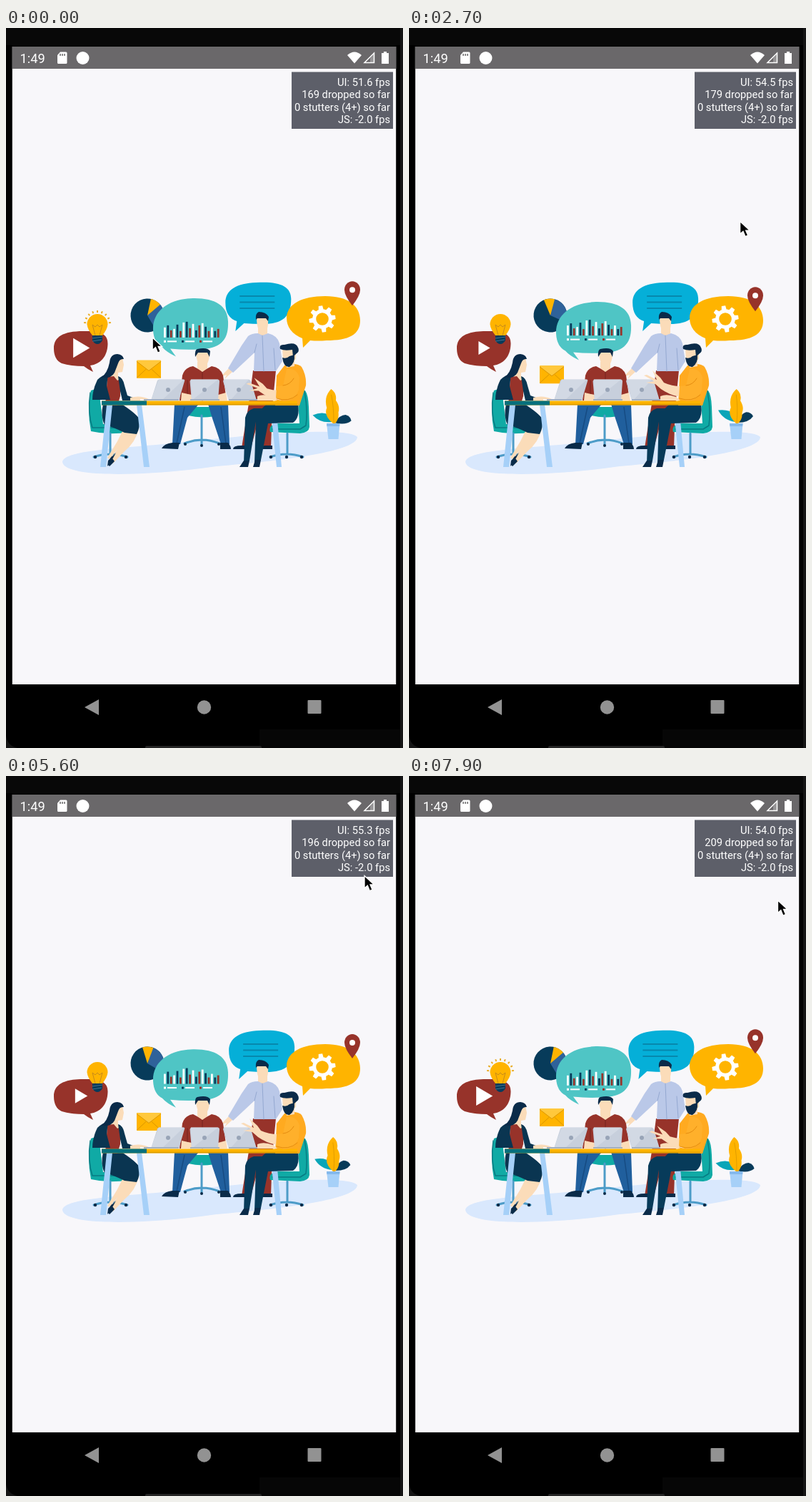
Recreate the animation shown at these times as an HTML page. Size 556 px wide and 1007 px high, loop 8000 ms.

```html
<!DOCTYPE html>
<html lang="en">
<head>
<meta charset="utf-8">
<style>
html, body { margin: 0; width: 100%; height: 100%; overflow: hidden; background: #000; }
svg { display: block; }
text { font-family: Roboto, sans-serif; fill: #fff; white-space: pre; }
.skin { fill: #fbdcb9; } .navy { fill: #073b5a; } .dark { fill: #0a2b49; }
.red { fill: #97332a; } .yellow { fill: #ffb400; } .teal { fill: #10aaa5; }
.sky { fill: #a6d0f8; } .white { fill: #fff; } .jacket { fill: #0a3551; }
.line { fill: none; stroke-linecap: round; stroke-linejoin: round; }
</style>
</head>
<body>
<svg width="556" height="1007" viewBox="0 0 556 1007">
  <!-- Phone and system bars -->
  <rect width="556" height="1007" fill="#000"/>
  <rect width="556" height="24" fill="#080808"/>
  <rect x="355" y="981" width="201" height="26" fill="#060606"/>
  <path d="M552 0h4v1007h-4zM0 990q2 14 16 17H0z" fill="#151515"/>
  <rect x="195" y="1004" width="163" height="5" rx="2" fill="#252525"/>
  <rect x="8.800" y="26" width="537.400" height="892" fill="#f8f7fa"/>
  <rect x="8.800" y="26" width="537.400" height="31" fill="#6a686a"/>
  <text x="19.500" y="48.500" font-size="18.300">1:49</text>
  <path class="white" d="M76 33.500h8q1.500 0 1.500 1.500v13.500q0 1.500-1.500 1.500H73.500q-1.500 0-1.500-1.500V38zM478 38q10-9 20 0l-10 11.500zM526 35h3v-2h4v2h3v15h-10z"/>
  <path d="M76 36v3m3-3v3m3-3v3" stroke="#6a686a" stroke-width="1.500"/>
  <circle class="white" cx="107.500" cy="42" r="9"/>
  <path d="M502 48.500h13.500V35z" fill="none" stroke="#fff" stroke-width="1.500"/>
  <path d="M510 42l5.500-6.500v13H510z" class="white" opacity=".3"/>
  <g fill="#929292"><path d="M110 950l20-11v22z"/><circle cx="277.500" cy="950" r="9.700"/><rect x="422.500" y="940" width="19" height="19" rx="1"/></g>

  <path d="M79 607C81 589 170 588 260 578C350 568 480 557 492 572C492 592 390 605 295 613C200 627 82 630 79 607Z" fill="#d9e8fd"/>

  <!-- Floating symbols -->
  <g id="pie">
    <circle class="navy" cx="198" cy="402" r="23.500"/>
    <path d="M198 402L207.500 380.500A23.500 23.500 0 0 1 216 417Z" fill="#2f629a"/>
    <path class="yellow" d="M198 402L195 378.700A23.500 23.500 0 0 1 210 381.700Z"/>
  </g>
  <g id="chartBubble">
    <path fill="#4fc5c5" d="M206 425C205 398 228 381.500 262 380.500C293 380 310.500 391 311 413C312 440 300 451 270 452Q249 453 230 451L238 462Q225 456 219 449Q207 443 206 425Z"/>
  </g>
  <g id="chart"></g>
  <g id="blueBubble">
    <path fill="#05afd8" d="M308 384C308 366 324 357 351 356C384 354 400 361 400 379C400 404 388 414 360 414Q346 414 334 413L322 424L324 410Q308 405 308 384Z"/>
    <path d="M328 375h49M328 383.500h49M328 392h49" stroke="#0788ad" stroke-width="2.200"/>
  </g>
  <path class="yellow" d="M393 405C394 386 414 375 447 375C480 375 496 389 496 409C496 429 480 437 449 437Q437 438 426 437L416 447L415 434Q393 425 393 405Z"/>
  <g id="gear" transform="translate(443 407)"></g>
  <g id="pin">
    <path class="red" d="M485 389Q474 375 474 367A11 12 0 0 1 496 367Q496 375 485 389Z"/>
    <circle class="white" cx="485" cy="367" r="4"/>
  </g>
  <path class="red" d="M67 448C67 432 80 424 108 424C134 423 143 429 142.500 442C142 460 132 470 118 472L122 481Q114 477 109 473Q91 473 78 469Q67 464 67 448Z"/>
  <path id="play" class="white" d="M-8-10L9 0L-8 10Z"/>
  <path class="yellow" d="M113.500 414.500A14.500 14.500 0 0 1 142.500 414.500Q142 421 135 430H121Q114 421 113.500 414.500Z"/>
  <path d="M125 430l-4-15 4 3 3-3 3 3 4-3-4 15" fill="none" stroke="#c68a1b" stroke-width="1"/>
  <path class="navy" d="M121 430h14v7q-3 5-7 5t-7-5z"/>
  <path d="M121 434l14-2m-14 6l13-2" stroke="#41718f" stroke-width="1"/>
  <g id="rays" stroke="#e9ad28" stroke-width="2"></g>
  <g id="mail">
    <rect class="yellow" x="183" y="468.500" width="34" height="25" rx="1.500"/>
    <path d="M183 470l17 13 17-13v-1.500h-34z" fill="#ffc83c"/>
    <path d="M183 470l17 13 17-13M183 493l13-12m21 12l-13-12" fill="none" stroke="#dc9600" stroke-width="1"/>
  </g>

  <!-- Plant -->
  <g id="leafLeft"><path d="M457 551Q440 551 431 538Q446 534 454 541Q458 546 457 551Z" fill="#0aa5b8"/></g>
  <g id="leafRight"><path class="navy" d="M460 552Q466 540 474 539Q481 540 483 546Q476 554 460 552Z"/></g>
  <g id="leafMid"><path class="yellow" d="M458 553Q445 542 450 531Q446 515 457 505Q465 511 463 521Q469 530 466 538Q467 547 461 553Z"/><path d="M459 552Q460 530 457 513" class="line" stroke="#db9800" stroke-width=".8"/></g>
  <path class="sky" d="M449 553h18.500l-2 22h-14z"/><path d="M449 553h18.500l-.4 4h-17.700z" fill="#85b9ec"/>

  <!-- Standing man -->
  <path class="red" d="M346 479H378L373 530L371 587H361L358 532L343 587H330L340 525Z"/>
  <path class="dark" d="M318 589q0-5 12-5h13v5zM357 589q0-5 6-5h10v5z"/>
  <path class="skin" d="M353 416h13v15h-13zM312 476L300 488L309 485L306 491L318 480Z"/>
  <path d="M339 431Q344 427 353 427L359 430L367 427Q380 430 383 441L387 466L378 480H347L348 454L318 482L311 476L330 444Z" fill="#bac8e8"/>
  <path d="M359 430L361 480M348 454l3-12M375 448l2 30" class="line" stroke="#94a8d1" stroke-width="1"/>
  <path class="skin" d="M351 405H367Q368 424 361 427Q351 426 351 405Z"/>
  <path class="dark" d="M350 408Q349 399 354 397Q364 397 368 404L367 410L364 406H352Z"/>

  <!-- Middle man and chair -->
  <path class="teal" d="M247 530h55v10q-25 9-55 0z"/>
  <path d="M274 542v35M250 581q24-10 49 0M274 572v11" class="line" stroke="#4d9cc8" stroke-width="3"/>
  <g class="dark"><circle cx="251" cy="582" r="2"/><circle cx="274" cy="584" r="2"/><circle cx="298" cy="582" r="2"/></g>
  <path d="M236 526H270L254 545L244 582H233ZM283 526H311L313 582H301L289 546Z" fill="#205f9d"/>
  <path d="M250 530l-11 51M301 530l7 51" stroke="#164b82" stroke-width="1.500"/>
  <path class="dark" d="M218 588q4-7 15-8h10l-2 9zM300 580h11q4 5 4 9h-15z"/>
  <path class="red" d="M262 473L275 480L288 473Q301 475 304 486L309 521H243L247 486Q250 475 262 473Z"/>
  <path d="M275 479v42M254 493v25M296 493v25" class="line" stroke="#73241f" stroke-width="1"/>
  <path class="skin" d="M268 467h14v9l-7 5-7-5zM266 454H285Q285 472 275 475Q267 471 266 454Z"/>
  <path class="dark" d="M265 460Q264 450 268 449Q282 446 286 452L285 460L282 454H269Z"/>
  <path class="skin" d="M246 510l14 3v8h-15zM297 513l11-3 2 11h-14z"/>

  <!-- Woman and chair -->
  <path class="teal" d="M119 507Q129 502 131 513L136 554H164Q173 555 172 565Q145 570 119 564Q113 534 119 507Z"/>
  <path d="M118 510q-4 28 3 49h48" class="line" stroke="#087b82" stroke-width="1.500"/>
  <path d="M146 567v29M123 600q23-8 47 0" class="line" stroke="#4d9cc8" stroke-width="3"/>
  <g class="dark"><circle cx="125" cy="600" r="2.200"/><circle cx="147" cy="600" r="2.200"/><circle cx="168" cy="600" r="2.200"/></g>
  <path class="skin" d="M166 558L186 560Q182 579 165 593L150 609L145 606L157 588L145 603L142 601L156 578Z"/>
  <path class="dark" d="M154 594l-7 13-5 6 1-8zM149 602l3 4-7 7-2-2z"/>
  <path class="jacket" d="M136 526H162Q182 539 187 547Q188 559 183 568L166 566Q150 558 138 555Q132 543 136 526Z"/>
  <path class="skin" d="M149 477h8v10l5 5-8 7-9-12z"/>
  <path class="red" d="M142 488l9-1 5 6 4-2v24l-4 13h-17z"/>
  <path class="jacket" d="M143 484L141 501L146 520H121Q121 506 128 492Q135 485 143 484ZM157 487Q164 489 166 500L170 514L178 517V521H163L160 508Z"/>
  <path class="skin" d="M174 517Q188 513 200 519L197 520L188 519V521H174Z"/>
  <path class="skin" d="M155 461H163L165 471L163 481L157 482L152 475Z"/>
  <path class="dark" d="M145 468Q146 456 156 456Q164 457 165 463Q159 462 157 469L152 482Q147 491 133 489Q142 483 145 468Z"/>

  <!-- Right chair and bearded man -->
  <path class="teal" d="M408 506H417Q423 508 424 530L425 558Q424 566 412 567L370 565Q367 556 379 553H411Z"/>
  <path d="M418 508q5 25 2 48l-8 5h-39" class="line" stroke="#077c83" stroke-width="1.500"/>
  <path d="M394 567v29M370 600q23-8 46 0" class="line" stroke="#4d9cc8" stroke-width="3"/>
  <g class="dark"><circle cx="371" cy="600" r="2.200"/><circle cx="393" cy="600" r="2.200"/><circle cx="414" cy="600" r="2.200"/></g>
  <path class="sky" d="M141 527h8l-9 87h-8zM183 527h7l11 87h-8zM370 527h8l8 87h-7z"/>
  <path class="navy" d="M364 527H409Q412 545 402 552L367 553L357 604L348 609L350 548Q354 535 364 527ZM347 532H384L382 547L350 550L341 605L333 609L335 545Q337 535 347 532Z"/>
  <path class="dark" d="M333 605h8l-2 9h-12zM349 604h8l-2 10h-9z"/>
  <path d="M390 472Q407 467 414 474Q421 486 420 500L411 528H377L379 486Z" fill="#ffaa20"/>
  <path class="skin" d="M391 461h13v12l-11 2zM387 448H406V463L396 470L388 465Z"/>
  <path class="dark" d="M384 449Q382 442 390 443Q406 438 409 447Q412 452 406 456L402 460L401 450Q390 452 384 449ZM387 461Q393 463 397 459L404 457Q405 469 397 474Q389 475 387 461Z"/>

  <!-- Laptops and table -->
  <path d="M214 491.500H249Q251 492 250 494L242 521H203L212 493ZM259 491.500H297Q299 492 299 494L297 521H260L257.500 494ZM305 491.500H340Q342 492 343 494L351 521H312L304 494Z" fill="#c7cfdc"/>
  <path d="M214 491.500H249L218 521H203ZM259 491.500H297L260 521ZM305 491.500H340L314 521H312Z" fill="#dce2ec" opacity=".55"/>
  <g fill="#98a4b7"><circle cx="227" cy="506" r="3"/><circle cx="278" cy="506" r="3"/><circle cx="326" cy="506" r="3"/></g>
  <path d="M193 520h49M258 520h41M312 520h52" stroke="#a3afc0" stroke-width="2"/>
  <path class="skin" d="M352 515Q361 511 374 516L380 521H352Z"/>
  <rect class="yellow" x="134" y="521.500" width="274" height="6"/>
  <rect x="134" y="521.500" width="63" height="6" fill="#08707c"/>
  <path d="M197 526.500h211" stroke="#da9b00" stroke-width="1.500"/>

  <!-- Gesturing arm -->
  <g id="forearm"><path class="skin" d="M386 516Q371 517 353 505L345 498L332 496L344 494L329 486L333 485L347 492L341 479L352 489L357 496Q368 501 380 501Z"/></g>
  <path d="M393 477Q407 475 411 489L410 506Q405 522 388 522L378 517L379 501L388 500Z" fill="#ffb02b"/>
  <path d="M388 500Q398 499 403 490M379 518q17 6 29-5" class="line" stroke="#e58c10" stroke-width="1"/>

  <!-- Performance monitor -->
  <rect x="400" y="61.500" width="142" height="79.500" fill="#5d5f69"/>
  <g font-size="14.700" text-anchor="end">
    <text id="uiRate" x="538" y="81"></text>
    <text id="dropped" x="538" y="98.300"></text>
    <text x="538" y="115.600">0 stutters (4+) so far</text>
    <text id="jsRate" x="538" y="132.900"></text>
  </g>
  <path id="cursor" d="M0 0V17.500L4.300 13.700L7.300 21L11 19.500L8 12.500H13.500Z" fill="#000" stroke="#fff" stroke-width="1.300"/>
</svg>
<script>
const LOOP = 8000, CYCLE = 4000;
const $ = id => document.getElementById(id);
const place = (id, value) => $(id).setAttribute('transform', value);
const clamp = x => Math.max(0, Math.min(1, x));
const ease = (a, b, x) => { const p = clamp((x - a) / (b - a)); return p * p * (3 - 2 * p); };

// Linear interpolation through rows of [position, value, ...].
function sample(rows, x) {
  const i = Math.max(1, rows.findIndex(row => row[0] >= x));
  const a = rows[i - 1], b = rows[i];
  const p = clamp((x - a[0]) / (b[0] - a[0]));
  return a.slice(1).map((v, k) => v + (b[k + 1] - v) * p);
}

const cursorPath = [[0, 205, 433], [1800, 443.5, 420], [3500, 481.5, 138], [4600, 490, 139.5],
  [5600, 502, 139.5], [7000, 522, 139], [7900, 516.5, 174], [8000, 516.5, 174]];
// Monitor readings arrive every half second: [reading, UI rate, dropped].
const readings = [[0, 51.6, 169], [3, 58, 175], [7, 50.9, 183], [9, 48.9, 192],
  [11, 55.3, 196], [14, 53.8, 206], [15, 54, 209]];

const barHeights = [14, 17, 10, 12, 18, 9, 21, 22, 13, 19, 10, 17, 20, 15, 9, 14, 9, 12];
const barColors = ['#fff', '#073b5a', '#97332a'];
$('chart').innerHTML = barHeights.map((h, i) =>
  `<rect x="${221 + i * 4.4}" y="${431.5 - h}" width="2.8" height="${h}" fill="${barColors[i % 3]}"/>`).join('') +
  [0, 1, 2].map(i => `<path d="M${221 + i * 25} 437h3" stroke="${barColors[i]}" stroke-width="3"/>
    <path d="M${226 + i * 25} 437h13" stroke="#fff" stroke-width="2"/>`).join('');

$('gear').innerHTML = '<circle r="11.3" fill="none" stroke="#fff" stroke-width="5"/>' +
  Array.from({ length: 8 }, (_, i) =>
    `<path class="white" d="M-3.5-13L-2.7-18.5H2.7L3.5-13Z" transform="rotate(${i * 45 - 8})"/>`).join('');

$('rays').innerHTML = Array.from({ length: 9 }, (_, i) =>
  `<path d="M128 398v-3" transform="rotate(${(i - 4) * 21} 128 414)"/>`).join('');

function draw(t) {
  const phase = t % CYCLE;
  const sway = Math.tanh(-2.5 * Math.cos((phase - 400) / CYCLE * 2 * Math.PI));
  place('blueBubble', `translate(${2.2 + 3 * sway})`);
  place('chartBubble', `translate(0 ${2.6 * sway})`);
  place('chart', `translate(0 ${-1.4 * sway})`);
  place('pin', `translate(0 ${3.2 + 4.2 * sway})`);
  place('mail', `translate(0 ${3.8 * sway})`);
  place('pie', `rotate(${2 - 18 * sway} 198 402)`);
  place('play', `translate(105 447.5) scale(${1.16 - .21 * sway})`);
  place('leafLeft', `rotate(${8 * sway} 457 551)`);
  place('leafRight', `rotate(${-8 * sway} 460 552)`);
  place('leafMid', `rotate(${2 * sway} 458 553)`);

  const rest = 1 - ease(100, 600, phase) + ease(2700, 3400, phase);
  place('forearm', `translate(${10 * rest} ${5 * rest}) rotate(${-7 * rest} 382 510)`);
  $('rays').style.display = phase >= 3700 || phase < 350 ? '' : 'none';

  const reading = Math.floor(t / 500);
  const [rate, lost] = sample(readings, reading);
  $('uiRate').textContent = `UI: ${rate.toFixed(1)} fps`;
  $('dropped').textContent = `${Math.round(lost)} dropped so far`;
  $('jsRate').textContent = `JS: ${reading === 14 ? '0.0' : '-2.0'} fps`;
  place('cursor', `translate(${sample(cursorPath, t).join(' ')})`);
}

const start = performance.now();
function tick() {
  draw((performance.now() - start) % LOOP);
  requestAnimationFrame(tick);
}
tick();
</script>
</body>
</html>
```
